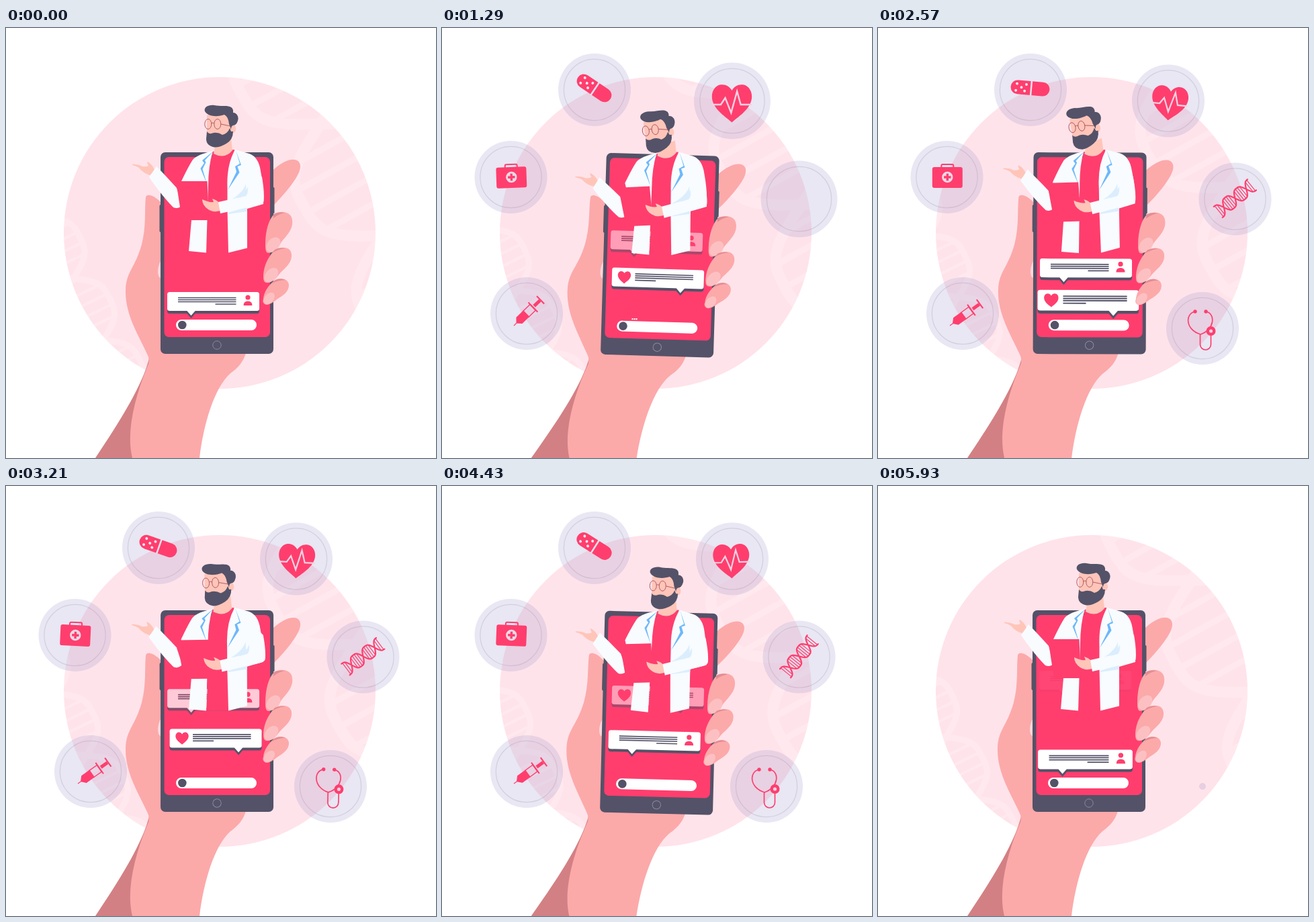
An HTML page for the animation above (6 s loop, 640 by 640 pixels).

```html
<!DOCTYPE html>
<html lang="en">
<head>
<meta charset="utf-8">
<title>Online doctor</title>
<style>
html, body { margin: 0; height: 100%; overflow: hidden; background: #fff; }
svg { display: block; width: 100vw; height: 100vh; }
</style>
</head>
<body>
<svg id="stage" viewBox="0 0 640 640"></svg>
<script>
const RED = '#ff3e6e', DARK = '#545268', SKIN = '#fca9aa', NAIL = '#fdc0c2',
  FACE = '#ffc5b9', COAT = '#f8fcff', SHADE = '#dceefd', BLUE = '#6db8fa', WIRE = '#a9525f';
const LOOP = 6000;

const path = (d, fill, extra = '') => `<path d="${d}" fill="${fill}" ${extra}/>`;
const line = (d, color, width, extra = '') =>
  `<path d="${d}" fill="none" stroke="${color}" stroke-width="${width}" ${extra}/>`;
const circle = (x, y, r, fill, extra = '') => `<circle cx="${x}" cy="${y}" r="${r}" fill="${fill}" ${extra}/>`;
const rect = (x, y, w, h, r, fill, extra = '') =>
  `<rect x="${x}" y="${y}" width="${w}" height="${h}" rx="${r}" fill="${fill}" ${extra}/>`;
const group = (id, body) => `<g id="${id}">${body}</g>`;
const place = (transform, body) => `<g transform="${transform}">${body}</g>`;

// Double helix along x; half is the distance between crossings
function helix(from, to, half, amp, color, width, rungGap, rungWidth) {
  const wave = s => amp * (Math.sin(Math.PI * s / half) + .1 * Math.sin(3 * Math.PI * s / half));
  let a = '', b = '', rungs = '';
  for (let s = from; s <= to; s += half / 24) {
    a += `${a ? 'L' : 'M'}${s},${wave(s).toFixed(2)}`;
    b += `${b ? 'L' : 'M'}${s},${(-wave(s)).toFixed(2)}`;
  }
  for (let s = from + rungGap / 2; s < to; s += rungGap)
    if (Math.abs(wave(s)) > amp * .45) rungs += `M${s},${wave(s)}V${-wave(s)}`;
  return line(a + b, color, width, 'stroke-linecap="round"') + line(rungs, color, rungWidth);
}

const heart = 'M0,29C-6,23 -27,11 -27,-6C-27,-15 -21,-22 -13.5,-22C-7.5,-22 -3,-19 0,-14' +
  'C3,-19 7.5,-22 13.5,-22C21,-22 27,-15 27,-6C27,11 6,23 0,29Z';

// Each icon turns about the point (dx, dy) from the disc centre
const dots = [[-20, -5], [-6, -5], [-13, 0], [-21, 5], [-8, 5]];
const icons = [
  { x: 126, y: 425, dx: -19, dy: 18, turn: [1290, -44, 2570, -36, 3790, -35, 5000, -37],
    art: place('translate(28 0)', line('M-28,0H-20', RED, 1.2) + path('M-23,0L-17,-6.5H-2V6.5H-17Z', RED) +
      line('M-4,-6H11V6H-4', RED, 1.4) + line('M11.5,-10V10M27,-8V8', RED, 2) + line('M14,0H26', RED, 5)) },
  { x: 102.5, y: 222, dx: .8, dy: 0, turn: [1290, -2, 2570, 0, 3790, 5, 5000, 0],
    art: rect(-22.5, -15, 45, 31, 3, RED) + line('M-9,-14V-17Q-9,-19 -7,-19H7Q9,-19 9,-17V-14', RED, 2) +
      circle(0, 0, 8.2, '#ecd9e6') + line('M-5.2,0H5.2M0,-5.2V5.2', RED, 3.4) },
  { x: 227, y: 92, dx: -.5, dy: -2.5, turn: [1300, 34, 2570, 5, 3790, 32, 6000, 34],
    art: rect(-29, -10.5, 58, 21, 10.5, RED) + line('M1.5,-11V11', '#eee0ec', 2.5) +
      dots.map(p => circle(p[0], p[1], 2, '#f6e8f0')).join('') },
  { x: 432, y: 108.5, dx: -.5, dy: 29, turn: [1290, 0, 2570, 6, 3790, 0, 4430, -2],
    art: place('translate(0 -29)', path(heart, RED) + line('M-27,5H-15L-9,-4L-1,16L7,-13L12,5H27', '#f3d3e2', 2.2)) },
  { x: 531.5, y: 254.5, dx: 0, dy: -1, turn: [2570, -39, 3790, -35, 4430, -51],
    art: helix(-32.5, 32.5, 21.5, 11.5, RED, 2.2, 3.6, 1.2) },
  { x: 483, y: 447, dx: 0, dy: 0, turn: [2570, 0, 3790, 3, 4430, 0],
    art: line('M-11,-25C-26,-22 -26,2 -3,9C18,2 20,-22 5,-25M-3.5,9V24A8,8 0 0 0 12.5,24V10', RED, 1.7) +
      circle(-11, -25, 2.7, RED) + circle(5, -25, 2.7, RED) +
      circle(12.5, 4, 4.8, 'none', `stroke="${RED}" stroke-width="4.4"`) },
];
const badges = icons.map((o, i) => place(`translate(${o.x} ${o.y})`,
  group('disc' + i, circle(0, 0, 54, '#8c87c3', 'opacity=".2"') +
    circle(0, 0, 45.6, 'none', 'stroke="#8a7c92" stroke-opacity=".22" stroke-width="1.2"')) +
  group('icon' + i, o.art))).join('');

// Chat bubbles: person (tail left) or heart (tail right)
function bubble(person) {
  const tail = person ? -33 : 34, left = person ? -52.5 : -34;
  const shape = `<rect x="-68.5" y="-14" width="137" height="28" rx="3.5"/><path d="M${tail - 7},13h14l-7,8Z"/>`;
  const text = [-5.5, -2.5, .5].map(y => `M${left},${y}h86.5`).join('') +
    (person ? 'M3,4h31' : `M${left},4h31`);
  const mark = person
    ? circle(51.5, -6, 3.6, RED) + path('M45,6Q45,-.5 51.5,-.5Q58,-.5 58,6Z', RED)
    : path(heart, RED, 'transform="translate(-50 -1) scale(.36)"');
  return `<g fill="${DARK}" transform="translate(0 4)">${shape}</g><g fill="#fff">${shape}</g>` +
    line(text, DARK, 1.7) + mark;
}
const messages = [
  { person: 1, at: -400, y: [100, 393, 500, 345, 900, 345, 1290, 300, 1600, 275], fade: [700, 1, 1290, .5, 1600, 0] },
  { person: 0, at: 450, y: [800, 393, 1500, 345, 1900, 345, 2300, 275], fade: [1900, 1, 2300, 0] },
  { person: 1, at: 1480, y: [1900, 393, 2400, 343, 2700, 343, 3600, 275], fade: [2900, 1, 3790, .04, 3900, 0] },
  { person: 0, at: 2370, y: [2800, 391, 3500, 344, 3800, 344, 4430, 296, 4700, 275], fade: [4100, 1, 4430, .5, 4700, 0] },
  { person: 1, at: 3640, y: [4000, 394, 4720, 345, 4900, 345, 5430, 303, 5930, 275],
    fade: [4900, 1, 5430, .5, 5930, .04, 6000, 0] },
  { person: 0, at: 4850, y: [5150, 393, 5700, 350], fade: [5280, 1, 5720, 0] },
];

const palm =
  path('M120,660L133,640C165,592 202,535 213,492L225,540L190,660Z', '#d38084') +
  path('M398,211C410,200 424,193 433,197C441,201 438,212 434,219C425,236 407,255 398,264L380,270V215Z', SKIN) +
  path('M194,660L188,640C178,600 193,545 212,500Q214,492 210,485C196,455 177,425 178,390' +
    'C179,362 192,358 202,322C209,295 206,270 208,252C209,245 223,249 234,264V480H358' +
    'C354,497 346,505 334,514C310,535 294,590 288,640L286,660Z', SKIN) +
  path('M231,346C225,353 224,371 230,372Z', '#ffd5da');

const finger = (d, shadow, x, y, rx, ry) => path(d, SKIN) + path(shadow, '#e28d93') +
  `<ellipse cx="${x}" cy="${y}" rx="${rx}" ry="${ry}" fill="${NAIL}" transform="rotate(-48 ${x} ${y})"/>`;
const fingers =
  finger('M386,322C386,302 391,285 399,277C409,271 425,273 426,286C428,301 415,311 409,320C402,332 393,337 388,334C386,331 386,327 386,322Z',
    'M398,283V277Q406,273 415,275Q405,277 398,283Z', 397.8, 322.5, 12.5, 8.8) +
  finger('M383,368C384,352 391,340 400,330C409,325 424,325 425,337C426,350 415,357 407,366C400,376 390,382 385,378C383,376 383,372 383,368Z',
    'M396,335L400,330Q408,326 416,328Q405,329 396,335Z', 394.8, 367.8, 12.5, 8.3) +
  finger('M383,403C384,392 391,383 399,376C408,370 421,373 421,383C421,393 411,399 403,404C395,411 387,414 384,410C382,408 382,406 383,403Z',
    'M394,381L399,376Q407,371 416,375Q405,375 394,381Z', 391.7, 402.5, 10, 6.6);

const phone = rect(228.5, 263, 4, 41, 2, DARK) + rect(396, 237, 3.5, 39, 1.5, DARK) +
  rect(230, 185, 168, 300, 7, DARK) + rect(235.5, 192, 157.5, 268, 7, RED) +
  circle(314, 472, 6.2, 'none', 'stroke="#8b899c" stroke-width="1"') +
  rect(253, 434, 120, 16, 8, '#fff') + circle(262.3, 442, 6.3, DARK) +
  group('typing', [276, 279, 282].map(x => circle(x, 431, 1.2, '#fff')).join(''));

const lens = x => `<ellipse cx="${x}" cy="143" rx="5" ry="7.5" fill="none" stroke="${WIRE}" stroke-width=".9"/>`;
const head =
  path('M299,130Q316,122 332,130L336,146L334,160L316,174L299,160Z', FACE) +
  `<ellipse cx="338" cy="150" rx="4.2" ry="6" fill="${FACE}"/>` +
  path('M296,124C294,118 301,114 310,115C319,117 327,115 333,117Q339,119 338,126C344,126 347,133 345,138' +
    'Q343,145 338,145Q335,146 335,151L332,143Q331,132 325,129C317,132 301,133 296,124Z', DARK) +
  path('M299,154Q302,159 309,156Q316,155 322,159Q330,157 333,149L335,154H338Q338,166 328,172Q318,178 310,177.5Q298,175 298,165Z', DARK) +
  lens(300.8) + lens(314.8) + line('M305.8,142Q308,140 309.8,142M319.8,143L334,146', WIRE, .9);

const leftArm =
  path('M188,202.5Q198,203 203,206Q208,207 212,205Q209,200 211,199Q218,203 222,213L214,219Q204,216 198,208Q193,205 188,204Z', FACE) +
  path('M224,206Q236,218 254,238L262,264Q256,270 249,267Q233,251 213,222Z', COAT);

const torso =
  path('M307,184L340,181L331,334H298Z', RED) +
  path('M312,172L335,164L337,182Q326,196 309,187Z', FACE) +
  path('M308,183Q285,188 278,196Q272,205 261,228L276,286L272,332L298,334.5L301,236Q301,205 308,183Z', COAT) +
  path('M341,181L362,187Q376,192 379,213Q384,238 383,262L359,269V327.5L331,334.5L329.5,270V238Q328,204 341,181Z', COAT) +
  path('M331,258Q353,246 357,232L358,250L331,262ZM330.5,275L359,266V273L331,277Z', SHADE) +
  path('M309,183L292,197L295,201L289.5,209L299,232L292.5,210L297.5,200L296,197Z', BLUE) +
  path('M342,182L348,202L341,206L343,214L330,241L347.5,215L344.5,206L350,204Z', BLUE);

const rightArm = path('M253,228H299.5L302,286H262Z', RED) +
  path('M292,255Q302,260 309,259L307,254Q314,256 318,261L319,272Q308,275 301,270Q292,264 292,255Z', FACE) +
  path('M316,259L357,250L374,215L381,222Q385,245 383.5,258Q383,262 374,264L319,276Z', COAT) +
  path('M360,236Q361,246 357,250L345,253Q356,246 360,236Z', SHADE);

document.getElementById('stage').innerHTML =
  '<clipPath id="round"><circle cx="318" cy="305" r="232"/></clipPath>' +
  circle(318, 305, 232, '#ffe3ea') +
  '<g clip-path="url(#round)" opacity=".22">' +
  group('bigHelix', place('translate(468 143) rotate(61)', helix(-380, 570, 190, 90, '#fff', 16, 36, 9))) +
  group('smallHelix', place('translate(100 373) rotate(64)', helix(-306, 306, 102, 40, '#fff', 9, 17, 4))) +
  '</g>' + badges +
  group('hand', palm + phone +
    messages.map((m, i) => group('msg' + i, bubble(m.person))).join('') +
    group('body', group('leftArm', leftArm) + torso + group('head', head) + group('rightArm', rightArm)) +
    fingers);

// Eased value from a flat list of time, value pairs
function ease(t, keys) {
  if (t <= keys[0]) return keys[1];
  for (let i = 2; i < keys.length; i += 2) {
    if (t < keys[i]) {
      const x = (t - keys[i - 2]) / (keys[i] - keys[i - 2]);
      return keys[i - 1] + (keys[i + 1] - keys[i - 1]) * x * x * (3 - 2 * x);
    }
  }
  return keys[keys.length - 1];
}

const move = (id, transform) => document.getElementById(id).setAttribute('transform', transform);
const fade = (id, value) => document.getElementById(id).setAttribute('opacity', value);

// Badges enter and leave one after another
const sinceIn = (t, i) => t - (20 + 255 * i);
const sinceOut = (t, i) => t - (4943 + 197 * i);

function discScale(t, i) {
  const out = sinceOut(t, i);
  if (out < -520) return ease(sinceIn(t, i), [0, 0, 290, 1.11, 720, 1]);
  if (out < -440) return ease(out, [-520, 1, -440, 1.055]);
  return out < 20 ? 1.055 * (1 - ((out + 440) / 460) ** 2.4) : 0;
}

function iconScale(t, i) {
  const out = sinceOut(t, i);
  return out < -460 ? ease(sinceIn(t, i), [270, 0, 500, 1.1, 740, 1]) : ease(out, [-460, 1, -270, 0]);
}

function draw(t) {
  const drift = Math.sin(Math.PI * t / LOOP);
  move('bigHelix', `translate(${-40 * drift} ${-74 * drift})`);
  move('smallHelix', `translate(${20 * drift} ${28 * drift})`);

  icons.forEach((o, i) => {
    move('disc' + i, `scale(${discScale(t, i)})`);
    move('icon' + i, `scale(${iconScale(t, i)}) translate(${o.dx} ${o.dy}) rotate(${ease(t, o.turn)})`);
  });

  const sway = ease(t, [0, 0, 1500, 1.8, 2800, .03, 3540, 0, 4795, 1.8, 5820, 0]);
  move('hand', `rotate(${sway} 210 685)`);

  const nod = ease(t, [0, 0, 900, -9, 2600, -9, 3500, 0]);
  const lower = ease(t, [0, 0, 1400, 1, 2800, .15, 3100, .15, 4500, .87, 5900, 0]);
  const reach = ease(t, [2600, 0, 3790, 5, 4600, 1.5, 5500, 0]);
  move('body', `rotate(${nod * .13} 315 340)`);
  move('head', `translate(0 ${3.5 * lower}) rotate(${nod} 320 205)`);
  move('leftArm', `translate(${3 * lower} ${11.5 * lower}) rotate(${-4 * lower} 258 262)`);
  move('rightArm', `translate(${reach} 0) rotate(${-3.2 * lower} 380 262)`);

  let typing = 0;
  messages.forEach((m, i) => {
    const now = i === 0 && t > 5300 ? t - LOOP : t;
    const size = ease(now - m.at, [0, 0, 200, 1.1, 400, 1]);
    move('msg' + i, `translate(${m.person ? 308.5 : 312} ${ease(now, m.y) + 14}) scale(${size})`);
    fade('msg' + i, ease(now, m.fade));
    if (now > m.at - 230 && now < m.at) typing = 1;
  });
  fade('typing', typing);
}

const start = performance.now();
function tick() {
  draw((performance.now() - start) % LOOP);
  requestAnimationFrame(tick);
}
tick();
</script>
</body>
</html>
```
